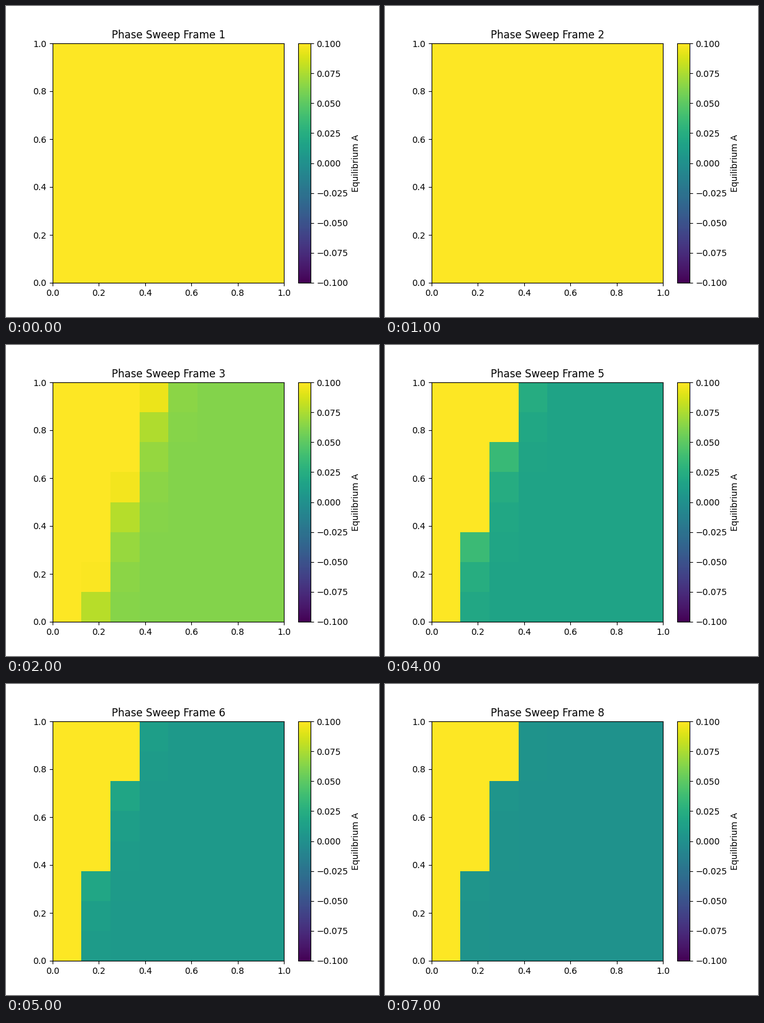
These frames come from a looping animation (600x500 px, 8 s). A matplotlib script:

```python
import numpy as np
import matplotlib.pyplot as plt
from matplotlib.animation import FuncAnimation

SIZE = 8
FRAMES = 8

row, col = np.mgrid[0:SIZE, 0:SIZE]
# Distance of each cell from the slanted boundary between the two phases.
dist = 3.08 * col - row
excess = 3.2 * 0.44 ** dist


def field(n):
    """One side stays saturated, the other halves at each step."""
    decay = 0.5 ** (n + 2) * (1 + excess)
    return np.where(dist < 0.5, 1, decay)


fig, ax = plt.subplots(figsize=(6, 5), dpi=100)
image = ax.imshow(field(0), origin="lower", extent=(0, 1, 0, 1),
                  aspect="auto", cmap="viridis", vmin=-0.1, vmax=0.1)
fig.colorbar(image, ax=ax, label="Equilibrium A")
title = ax.set_title("Phase Sweep Frame 1")


def update(n):
    image.set_data(field(n))
    title.set_text(f"Phase Sweep Frame {n + 1}")
    return image, title


anim = FuncAnimation(fig, update, frames=FRAMES, interval=1000,
                     repeat=True, repeat_delay=0, blit=False)
plt.show()
```
